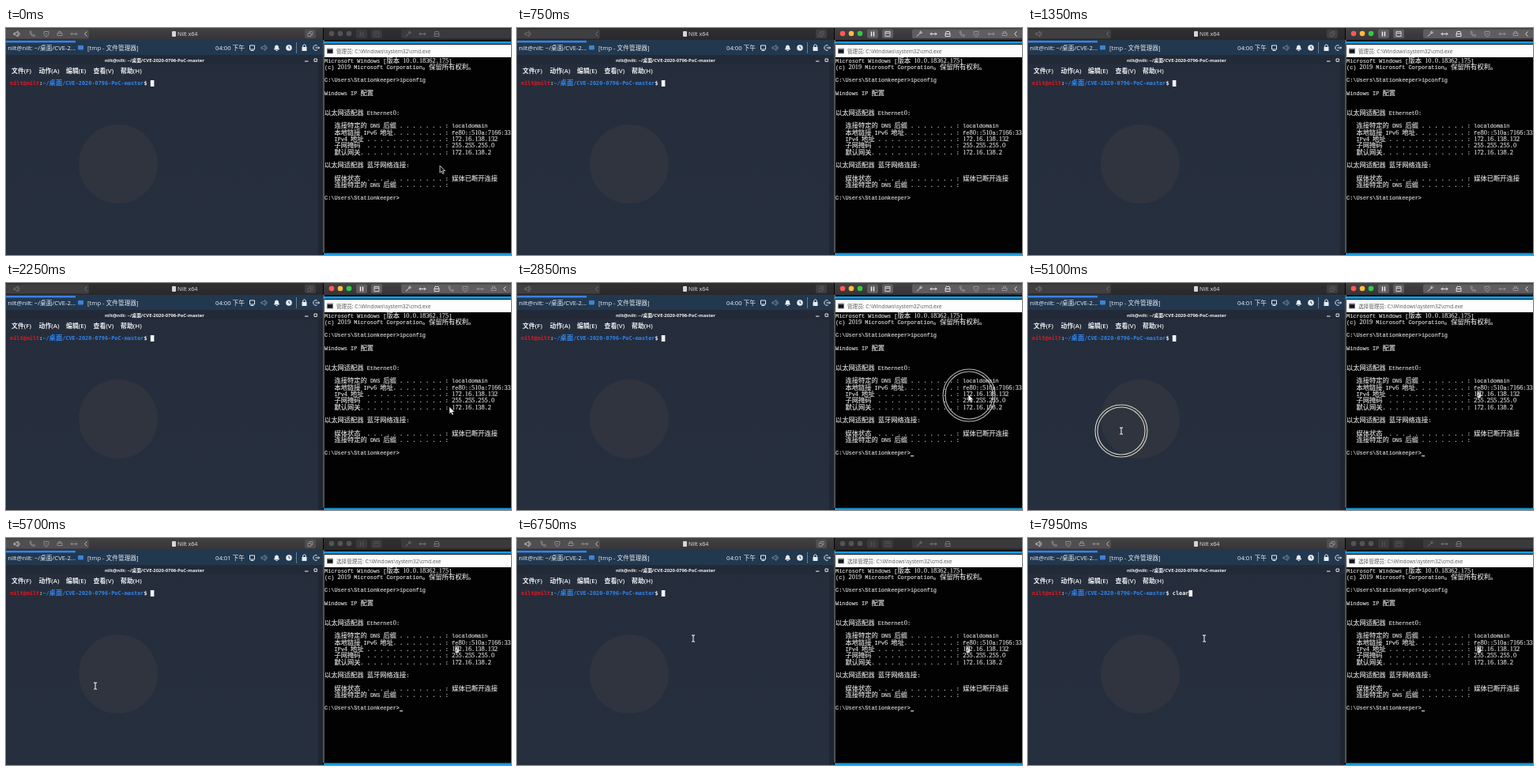
An HTML page that plays this animation: 639x287 px, repeating every 8000 ms.

```html
<!DOCTYPE html>
<html lang="zh">
<head>
<meta charset="utf-8">
<style>
html, body { margin: 0; width: 100%; height: 100%; overflow: hidden; background: #000; }
svg { display: block; width: 639px; height: 287px; }
text { white-space: pre; font-family: "Open Sans", "Noto Sans CJK SC", "Noto Sans CJK", sans-serif; }
.mono { font-family: "Liberation Mono", "Noto Sans CJK SC", "Noto Sans CJK", monospace; }
.digit { font-family: "Liberation Serif", serif; }
.mono, .digit { stroke: currentColor; stroke-width: 0.15; }
.bold { font-family: "DejaVu Sans Mono", "Noto Sans CJK SC", "Noto Sans CJK", monospace; font-weight: 700; }
</style>
</head>
<body>
<script>
const NS = 'http://www.w3.org/2000/svg';
const LOOP = 8000, STEP = 150, CELL = 4.135;
const USER = 'nilt', HOST = 'nilt', ADMIN = 'Stationkeeper';
const FOLDER = '~/桌面/CVE-2020-0796-PoC-master';

function add(parent, tag, attrs = {}, content) {
  const node = document.createElementNS(NS, tag);
  for (const key in attrs) node.setAttribute(key, attrs[key]);
  if (content !== undefined) node.textContent = content;
  parent.append(node);
  return node;
}
const svg = add(document.body, 'svg', { viewBox: '0 0 639 287', width: 639, height: 287 });
const group = (parent = svg) => add(parent, 'g');
const rect = (x, y, width, height, fill, parent = svg, rx = 0) =>
  add(parent, 'rect', { x, y, width, height, fill, rx });
const circle = (cx, cy, r, fill, parent = svg) => add(parent, 'circle', { cx, cy, r, fill });
const label = (str, x, y, size, fill, weight = 400, anchor = 'start', parent = svg) =>
  add(parent, 'text', { x, y, 'font-size': size, fill, 'font-weight': weight, 'text-anchor': anchor }, str);
const line = (d, x, y, stroke, parent = svg, width = 1) =>
  add(parent, 'path', { d, transform: `translate(${x} ${y})`, fill: 'none', stroke, 'stroke-width': width });

// Terminal text on a cell grid; wide characters take two cells.
// Plain digits use a serif face, whose figures are half an em wide.
function mono(str, x, y, color, cls = 'mono', parent = svg) {
  for (const run of str.match(/[\u3000-\u9fff]+|\d+|[^\d\u3000-\u9fff]+/g)) {
    const wide = run.charCodeAt(0) >= 0x3000;
    const digit = cls === 'mono' && /\d/.test(run);
    const size = wide || digit ? CELL * 2 : cls === 'bold' ? CELL / 0.602 : CELL / 0.6;
    add(parent, 'text', { x, y, fill: color, color, class: digit ? 'digit' : cls, 'font-size': size }, run);
    x += run.length * CELL * (wide ? 2 : 1);
  }
  return x;
}
function gradient(id, from, to) {
  const g = add(svg, 'linearGradient', { id, x2: 0, y2: 1 });
  add(g, 'stop', { 'stop-color': from });
  add(g, 'stop', { offset: 1, 'stop-color': to });
  return `url(#${id})`;
}
const barOn = gradient('on', '#434144', '#363437');
const barOff = gradient('off', '#302f31', '#29282a');

const ICON = {
  sound: 'M-4-1h2l3-2.5v7L-2 1h-2zM2.5-2q1.5 2 0 4',
  phone: 'M-3-3l1.5-.5 1 2-1 1q.5 1.5 2 2l1-1 2 1-.5 1.5Q-2 3-3-3z',
  shield: 'M-3-3h6v3q-1 3-3 3.5Q-2 3-3 0zM-1 0h2',
  keys: 'M-3-1h6v3h-6zM-1.5-1v-2h3v2',
  chevron: 'M1.5-3L-1.5 0 1.5 3',
  wrench: 'M-3 3L1-1M1-1q-1-2 1.5-2.5M1-1q2 1 2.5-1.5',
  arrows: 'M-4 0h8M-2-2L-4 0l2 2M2-2l2 2-2 2',
  drive: 'M-3 0l1-3h4l1 3v3h-6zM-3 0h6',
  copy: 'M-3-1h4v4h-4zM-1-1v-2h4v4h-2'
};
const icons = (list, color, parent) =>
  list.forEach(([name, x]) => line(ICON[name], x, 7.5, color, parent, 1));

// Left window
rect(0, 0, 401, 287, gradient('desk', '#252d3b', '#262f3e'));
rect(395, 46, 6, 241, '#1f2631');
circle(142, 172, 50, '#30343e');
rect(0, 15, 401, 19, '#22384f');
rect(0, 16, 88, 2.5, '#3a82e4');
label(`${USER}@${HOST}: ~/桌面/CVE-2...`, 88, 27.6, 7.7, '#f0f2f5', 400, 'end');
rect(91, 22, 7, 5.5, '#3d83d6', svg, 0.8);
label('[tmp - 文件管理器]', 103, 27.6, 7.7, '#e6e9ee');
const clock = label('', 265, 27.6, 7.7, '#f2f4f7');
line('M-3-3h6v5h-6zM-2 3.5h4', 311.5, 25, '#e8ebf0');
line(ICON.sound, 327, 25, '#75869c');
const bell = line('M-3 2q1-1 1-3 0-2 2-2t2 2q0 2 1 3zM-1 3.5h2', 342.5, 25, '#e8ebf0');
bell.setAttribute('fill', '#e8ebf0');
circle(358, 25, 3.8, '#e8ebf0');
line('M0-2v2l1.5 1', 358, 25, '#22384f');
rect(367, 18, 0.8, 14, '#7d8da0');
rect(374.5, 24, 6, 5, '#e8ebf0');
line('M-1.8 0v-2q1.8-2.5 3.6 0v2', 377.5, 24, '#e8ebf0');
line('M1-3a3.3 3.3 0 1 0 0 6M-1 0h5M2.5-1.5L4 0 2.5 1.5', 392.5, 25, '#e8ebf0');

rect(0, 34, 401, 12, '#232a37');
label(`${USER}@${HOST}: ${FOLDER}`, 188, 43.2, 5.9, '#f0f2f5', 700, 'middle');
rect(378, 41.5, 4.5, 1.1, '#e0e3e8');
line('M0 0h3.4v3.4h-3.4z', 390, 39, '#e0e3e8');
['文件(F)', '动作(A)', '编辑(E)', '查看(V)', '帮助(H)'].forEach((name, i) =>
  label(name, 7 + i * 34.5, 57.2, 7.9, '#eef0f3', 600));

let x = mono(`${USER}@${HOST}`, 5, 72.4, '#f0141e', 'bold');
x = mono(':', x, 72.4, '#e8eaee', 'bold');
x = mono(FOLDER, x, 72.4, '#2f86f0', 'bold');
const promptX = mono('$ ', x, 72.4, '#e8eaee', 'bold');
const typed = add(svg, 'text', { x: promptX, y: 72.4, class: 'bold', fill: '#f0f2f5', 'font-size': CELL / 0.602 });
const block = rect(promptX, 66, 4.6, 8, '#f4f5f7');

// Right window
rect(401, 0, 238, 287, '#020202');
rect(402, 15, 237, 2, '#111214');
rect(402, 17, 237, 3, '#1296e0');
rect(403, 21, 236, 16, '#fdfdfd');
rect(402, 284.5, 237, 2.5, '#1599e2');
rect(401.5, 15, 1, 269, '#9aa0a8');
rect(406, 25.5, 8, 7, '#8b9096', svg, 0.6);
rect(406.8, 27.2, 6.4, 4.5, '#15171a');
const cmdTitle = label('', 418, 31.6, 6.6, '#5c5c5c');

const dots = n => ' .'.repeat(n);
const rowY = n => 43.6 + n * 8.28;
const rows = [
  [0, 'Microsoft Windows [版本 10.0.18362.175]'],
  [1, '(c) 2019 Microsoft Corporation。保留所有权利。'],
  [3, `C:\\Users\\${ADMIN}>ipconfig`],
  [5, 'Windows IP 配置'],
  [8, '以太网适配器 Ethernet0:'],
  [10, `   连接特定的 DNS 后缀${dots(7)} : localdomain`],
  [11, `   本地链接 IPv6 地址.${dots(7)} : fe80::510a:7166:33`],
  [12, `   IPv4 地址${dots(12)} : 172.16.138.132`],
  [13, `   子网掩码 ${dots(12)} : 255.255.255.0`],
  [14, `   默认网关.${dots(12)} : 172.16.138.2`],
  [16, '以太网适配器 蓝牙网络连接:'],
  [18, `   媒体状态 ${dots(12)} : 媒体已断开连接`],
  [19, `   连接特定的 DNS 后缀${dots(7)} :`],
  [21, `C:\\Users\\${ADMIN}>`]
];
rows.forEach(([n, str]) => mono(str, 403, rowY(n), '#dedede'));

const mark = group();
rect(403 + 40 * CELL, rowY(12) - 6.6, CELL + 0.4, 8.4, '#e4e4e4', mark);
mono('7', 403 + 40 * CELL, rowY(12), '#222', 'mono', mark);
const caret = rect(403 + 23 * CELL, rowY(21) + 0.6, 4, 1.2, '#dcdcdc');

// Host title bars, focused and unfocused
function leftBar(on) {
  const g = group();
  rect(0, 0, 401, 15, on ? barOn : barOff, g);
  const color = on ? '#c4c2c5' : '#727073', dim = on ? '#8d8b8e' : '#5a585b';
  rect(-4, 1.5, 109, 12, on ? '#504e51' : '#3f3e40', g, 2);
  icons([['sound', 14], ['chevron', 101]], color, g);
  if (on) icons([['phone', 33], ['shield', 51], ['keys', 68], ['arrows', 86]], dim, g);
  rect(378, 1.5, 14, 11.5, on ? '#504e51' : '#3f3e40', g, 2);
  icons([['copy', 385]], dim, g);
  return g;
}
function rightBar(on) {
  const g = group();
  rect(402, 0, 237, 15, on ? barOn : barOff, g);
  ['#fb5b57', '#fcbc40', '#34c84a'].forEach((c, i) =>
    circle(412 + i * 11, 7, 3.3, on ? c : '#555356', g));
  const color = on ? '#e0dee1' : '#767477', dim = on ? '#949295' : '#504e51';
  const box = on ? '#5f5d60' : '#3a393b';
  rect(443, 1.5, 14, 11.5, box, g, 2);
  rect(462, 1.5, 14, 11.5, box, g, 2);
  line('M-1.5-3v6M1.5-3v6', 450, 7.5, on ? '#f0eef1' : dim, g, 1.4);
  line('M-3-3h6v6h-6zM-3-1h6', 469, 7.5, on ? '#d0ced1' : dim, g);
  rect(500, 1.5, 139, 11.5, box, g, 2);
  icons([['wrench', 509], ['arrows', 527], ['drive', 545]], color, g);
  if (on) {
    icons([['phone', 563], ['shield', 581], ['arrows', 600], ['keys', 617]], dim, g);
    icons([['chevron', 631]], color, g);
  }
  return g;
}
const bars = { left: [leftBar(false), leftBar(true)], right: [rightBar(false), rightBar(true)] };
rect(210, 4, 5, 7, '#d6d5d7', svg, 1);
label('Nilt x64', 217, 10.1, 7.2, '#e6e5e7', 500);

// Click ring and pointers
const ring = group();
[33, 30].forEach(r => add(ring, 'circle', { r, fill: 'none', 'stroke-width': 1.1 }));
const ARROW = 'M0 0v9l2.1-1.9 1.5 3.3 1.6-.8-1.5-3.1h2.9z';
const pointers = [
  group(),
  add(svg, 'path', { d: ARROW, fill: '#151515', stroke: '#d0d0d0', 'stroke-width': 0.9 }),
  add(svg, 'path', { d: ARROW, fill: '#f6f6f6', stroke: '#333', 'stroke-width': 0.5 }),
  line('M-2-4.2q2 0 2 1.2v6q0 1.2-2 1.2M2-4.2q-2 0-2 1.2M0 3q0 1.2 2 1.2', 0, 0, '#dcdcdc', svg, 1.2)
];

// time, x, y, pointer kind
const path = [
  [0, 549, 174, 1], [600, 549, 174, 0], [1800, 551, 172, 2], [2700, 571, 141, 2],
  [3000, 571, 141, 2], [3150, 572, 142, 2], [4050, 572, 142, 2], [4350, 400, 160, 3],
  [4800, 118, 187, 3], [5250, 118, 187, 3], [5550, 113, 187, 3], [6000, 113, 187, 3],
  [6750, 223, 127, 3], [LOOP, 223, 127, 3]
];
const clicks = [[2700, 3000, 572, 142, '#b9b9b9'], [4950, 5250, 118, 187, '#d6d4c6']];

const show = (node, on) => node.setAttribute('visibility', on ? 'visible' : 'hidden');
const move = (node, x, y) => node.setAttribute('transform', `translate(${x} ${y})`);

function pointerAt(t) {
  const i = path.findIndex(p => p[0] > t) - 1;
  const [t0, x0, y0, kind] = path[i], [t1, x1, y1] = path[i + 1];
  const u = (t - t0) / (t1 - t0), e = u * u * (3 - 2 * u);
  return [x0 + (x1 - x0) * e, y0 + (y1 - y0) * e, kind];
}
function caretOn(t) {
  if (t >= 4690) return true;
  return t > 1510 && t < 3150 && (t - 1510) % 1060 < 530;
}
function draw(time) {
  const t = Math.floor(time / STEP) * STEP;
  const right = t >= 450 && t < 5250;
  bars.left.forEach((g, i) => show(g, i === +!right));
  bars.right.forEach((g, i) => show(g, i === +right));

  const selected = t >= 3000;
  show(mark, selected);
  cmdTitle.textContent = (selected ? '选择' : '') + '管理员: C:\\Windows\\system32\\cmd.exe';
  clock.textContent = (t < 4650 ? '04:00' : '04:01') + ' 下午';
  show(caret, caretOn(t));

  const count = Math.max(0, Math.min(5, Math.floor((t - 6900) / STEP) + 1));
  typed.textContent = 'clear'.slice(0, count);
  block.setAttribute('x', promptX + count * CELL);

  const [px, py, kind] = pointerAt(t);
  pointers.forEach((p, i) => { show(p, i === kind); move(p, px, py); });
  const click = clicks.find(c => t >= c[0] && t < c[1]);
  show(ring, click);
  if (click) {
    move(ring, click[2], click[3]);
    ring.setAttribute('stroke', click[4]);
  }
}
const start = performance.now();
function tick() {
  draw((performance.now() - start) % LOOP);
  requestAnimationFrame(tick);
}
tick();
</script>
</body>
</html>
```
